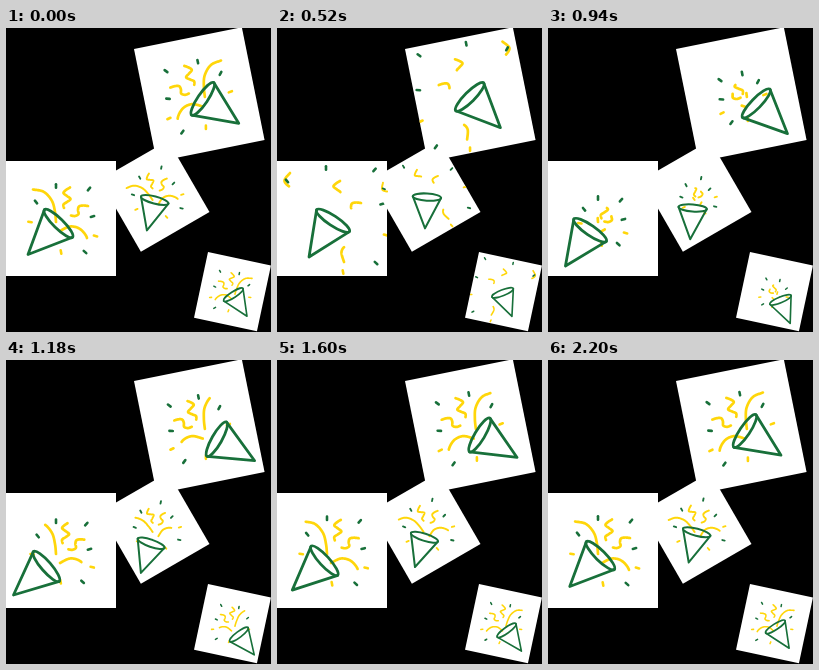
Recreate the animation shown at these times as an HTML page with a canvas. Size 265 px wide and 304 px high, loop 2220 ms.

```html
<!DOCTYPE html>
<html lang="en">
<head>
<meta charset="utf-8">
<title>Party poppers</title>
<style>
  html, body { margin: 0; width: 100%; height: 100%; overflow: hidden; background: #000; }
  canvas { display: block; width: 265px; height: 304px; }
</style>
</head>
<body>
<canvas id="stage" width="265" height="304"></canvas>
<script>
const ctx = document.getElementById('stage').getContext('2d');
const LOOP = 2220;
const CARD_W = 110, CARD_H = 115;
const GREEN = '#18703a', YELLOW = '#ffd60a';
const BURST = [50, 65];

// Top-left corner, scale, rotation in degrees, mirrored
const cards = [
  { x: 0, y: 133, scale: 1, turn: 0 },
  { x: 93.5, y: 152, scale: 0.72, turn: -30 },
  { x: 128, y: 21, scale: 1, turn: -11.4, mirror: true },
  { x: 202, y: 224, scale: 0.585, turn: 12, mirror: true }
];

// Resting place, then the place where the confetti flies off
const confetti = [
  [GREEN, [50, 25], [49, 7]],
  [GREEN, [83, 28], [97.5, 9]],
  [GREEN, [86.5, 55.5], [105, 43]],
  [GREEN, [79, 91], [99, 102]],
  [GREEN, [30, 41], [10, 20]],
  [YELLOW, [24, 61], [-4, 60]],
  [YELLOW, [55, 91], [66, 111]],
  [YELLOW, [89.5, 75], [108.5, 74]]
];

// Time, tip x, tip y, tilt in degrees
const coneKeys = [
  [0, 22, 93.5, 0],
  [520, 32, 96, -11],
  [710, 32, 97, -13],
  [940, 17.5, 105, -10],
  [1080, 9.5, 105, 0],
  [1180, 7.5, 102, 4.5],
  [1440, 11.5, 99, 4.5],
  [1780, 19, 95.3, 1.5],
  [LOOP, 22, 93.5, 0]
];

const clamp = v => Math.min(1, Math.max(0, v));
const mix = (a, b, k) => a + (b - a) * k;
const mixPoint = (a, b, k) => [mix(a[0], b[0], k), mix(a[1], b[1], k)];
const smooth = k => k * k * (3 - 2 * k);
const settle = (t, start, decay) => t < start ? 0 : 1 - Math.exp((start - t) / decay);

function hermite(a, b, ma, mb, k) {
  const k2 = k * k, k3 = k2 * k;
  return (2 * k3 - 3 * k2 + 1) * a + (k3 - 2 * k2 + k) * ma
       + (3 * k2 - 2 * k3) * b + (k3 - k2) * mb;
}

function spline(points, steps = 14) {
  const at = i => points[Math.min(points.length - 1, Math.max(0, i))];
  const out = [];
  for (let i = 0; i < points.length - 1; i++) {
    for (let j = 0; j < steps; j++) {
      out.push([0, 1].map(c => hermite(at(i)[c], at(i + 1)[c],
        (at(i + 1)[c] - at(i - 1)[c]) / 2, (at(i + 2)[c] - at(i)[c]) / 2, j / steps)));
    }
  }
  out.push(points[points.length - 1]);
  return out;
}

const ribbons = [
  { rest: 4 / 7, path: spline([[50, 61], [49, 51], [46, 40], [38, 31], [27, 28.5], [15, 27], [7.5, 20], [13, 12]]) },
  { rest: 3 / 7, path: spline([[54, 70], [64, 65.5], [74, 68], [81, 77], [79, 86], [69, 85], [64.5, 91], [67, 101]]) }
];
const squiggles = [
  { drift: [-1, -6.5], path: spline([[58, 47], [57.5, 43.5], [61, 41], [64.5, 38], [61, 35], [57.5, 32], [60, 29], [64, 26.5]]) },
  { drift: [2, -3], path: spline([[65, 54.5], [69, 55], [72.5, 53], [72, 49], [73, 45.5], [77, 44.5], [82, 45]]) }
];

function strokeTrimmed(path, from, to, dx = 0, dy = 0) {
  if (to - from < 0.01) return;
  const last = path.length - 1;
  const pointAt = f => {
    const i = Math.min(last - 1, Math.floor(f * last));
    return mixPoint(path[i], path[i + 1], f * last - i);
  };
  const steps = 70;
  ctx.beginPath();
  for (let i = 0; i <= steps; i++) {
    const [x, y] = pointAt(mix(from, to, i / steps));
    ctx.lineTo(x + dx, y + dy);
  }
  ctx.stroke();
}

function drawStreamers(t) {
  ctx.strokeStyle = YELLOW;
  ctx.lineWidth = 2.7;
  const leaving = t < 630;
  const away = clamp(t / 520) ** 1.5;

  for (const { rest, path } of ribbons) {
    if (leaving) {
      strokeTrimmed(path, clamp(t / 620) ** 1.6, mix(rest, 1, smooth(clamp(t / 450))));
    } else {
      strokeTrimmed(path, 0, rest * settle(t, 915, 210));
    }
  }
  for (const { drift, path } of squiggles) {
    if (leaving) {
      strokeTrimmed(path, clamp(t / 630) ** 4.2, 1, drift[0] * away, drift[1] * away);
    } else {
      const grow = settle(t, 830, 200), base = path[0];
      strokeTrimmed(path, 0, clamp(grow * 1.15),
        (grow - 1) * (base[0] - BURST[0]), (grow - 1) * (base[1] - BURST[1]));
    }
  }
}

function drawConfetti(t) {
  if (t > 580 && t < 725) return;
  const leaving = t <= 580;
  const half = leaving ? 1.7 * clamp((600 - t) / 60) : 1.7;
  ctx.lineWidth = 2.6;
  for (const [color, rest, end] of confetti) {
    const [x, y] = leaving
      ? mixPoint(rest, end, Math.min(1.06, (t / 520) ** 1.5))
      : mixPoint(BURST, rest, settle(t, 720, 185));
    const angle = Math.atan2(rest[1] - BURST[1], rest[0] - BURST[0]);
    const dx = Math.cos(angle) * half, dy = Math.sin(angle) * half;
    ctx.strokeStyle = color;
    ctx.beginPath();
    ctx.moveTo(x - dx, y - dy);
    ctx.lineTo(x + dx, y + dy);
    ctx.stroke();
  }
}

function conePose(t) {
  const n = coneKeys.length - 1;
  let i = 0;
  while (i < n - 1 && t >= coneKeys[i + 1][0]) i++;
  const a = coneKeys[i], b = coneKeys[i + 1], span = b[0] - a[0];
  const slope = (k, c) => {
    const wraps = k === 0 || k === n;
    const prev = coneKeys[wraps ? n - 1 : k - 1], next = coneKeys[wraps ? 1 : k + 1];
    return (next[c] - prev[c]) / (next[0] - prev[0] + (wraps ? LOOP : 0)) * span;
  };
  return [1, 2, 3].map(c => hermite(a[c], b[c], slope(i, c), slope(i + 1, c), (t - a[0]) / span));
}

function drawCone(t) {
  const [x, y, tilt] = conePose(t);
  const length = 43.5, radius = 19.7;
  ctx.save();
  ctx.translate(x, y);
  ctx.rotate((tilt - 45.5) * Math.PI / 180);
  ctx.strokeStyle = GREEN;
  ctx.lineWidth = 2.8;
  ctx.beginPath();
  ctx.moveTo(length, -radius);
  ctx.lineTo(0, 0);
  ctx.lineTo(length, radius);
  ctx.stroke();
  ctx.beginPath();
  ctx.ellipse(length, 0, 5, radius, 0, 0, Math.PI * 2);
  ctx.stroke();
  ctx.restore();
}

function drawCard(card, t) {
  ctx.save();
  ctx.translate(card.x, card.y);
  ctx.rotate(card.turn * Math.PI / 180);
  ctx.scale(card.scale, card.scale);
  if (card.mirror) {
    ctx.translate(CARD_W, 0);
    ctx.scale(-1, 1);
  }
  ctx.beginPath();
  ctx.rect(0, 0, CARD_W, CARD_H);
  ctx.fillStyle = '#fff';
  ctx.fill();
  ctx.clip();
  drawStreamers(t);
  drawConfetti(t);
  drawCone(t);
  ctx.restore();
}

function render(t) {
  ctx.fillStyle = '#000';
  ctx.fillRect(0, 0, 265, 304);
  ctx.lineCap = ctx.lineJoin = 'round';
  for (const card of cards) drawCard(card, t);
}

const start = performance.now();
function frame() {
  render((performance.now() - start) % LOOP);
  requestAnimationFrame(frame);
}
frame();
</script>
</body>
</html>
```
